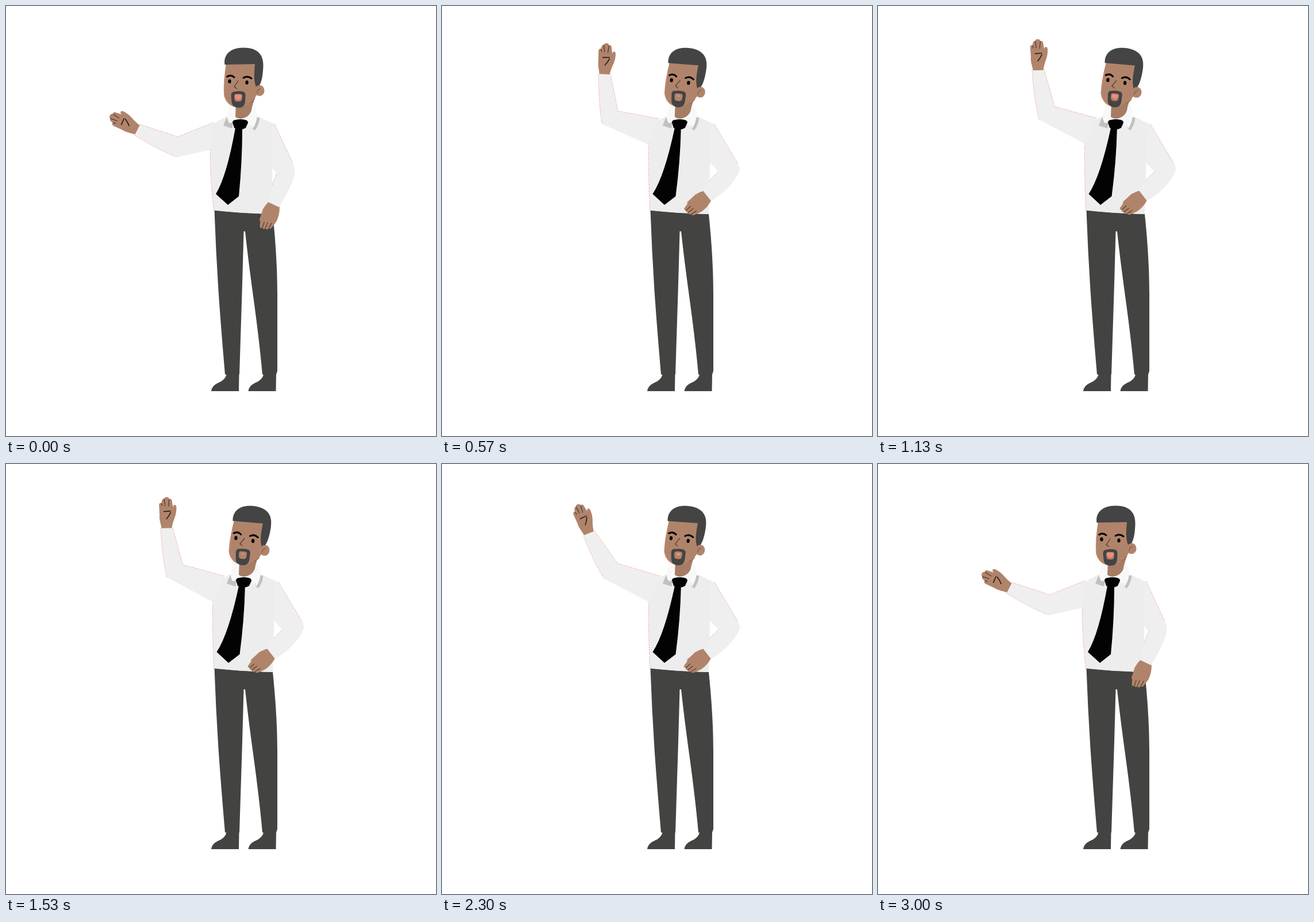
Recreate the animation shown at these times as an HTML page with a canvas. Size 748 px wide and 748 px high, loop 3.03 s.

```html
<!DOCTYPE html>
<html lang="en">
<head>
<meta charset="utf-8">
<title>Waving man</title>
<style>
html, body { margin: 0; width: 100%; height: 100%; overflow: hidden; background: #fff; }
canvas { display: block; width: 748px; height: 748px; }
</style>
</head>
<body>
<canvas id="stage" width="748" height="748"></canvas>
<script>
const ctx = document.getElementById('stage').getContext('2d');
const LOOP = 3030;
const RAD = Math.PI / 180;
const SHIRT = '#ededed', SLEEVE = '#efefef', SKIN = '#b0846b', HAIR = '#444', PANTS = '#434341';
const INK = '#030303', GRAY = '#c0c0c0', FRINGE = '#f29a92';

// [time, value] keys joined by a cosine ease
const KEYS = {
  lean:   [[0, 0], [640, 1], [2250, 1], [2890, 0]],
  head:   [[0, 0], [690, 1], [2150, 1], [2780, 0]],
  raise:  [[0, 0], [740, 1], [2370, 1], [2980, 0]],
  akimbo: [[0, 0], [640, 1], [2370, 1], [2950, 0]],
  fore:   [[0, 67], [480, 3], [835, 30], [1335, 1], [1835, 30], [2320, 30], [2980, 67]]
};

const lerp = (a, b, k) => a + (b - a) * k;

function track(keys, t) {
  for (let i = 1; i < keys.length; i++) {
    const [t0, a] = keys[i - 1], [t1, b] = keys[i];
    if (t < t1) return lerp(a, b, 0.5 - 0.5 * Math.cos(Math.PI * (t - t0) / (t1 - t0)));
  }
  return keys[keys.length - 1][1];
}

function fill(d, color) {
  ctx.fillStyle = color;
  ctx.fill(new Path2D(d));
}

function line(d, width, color) {
  ctx.lineWidth = width;
  ctx.strokeStyle = color;
  ctx.stroke(new Path2D(d));
}

function fringe(d) {
  ctx.setLineDash([2, 2]);
  line(d, 1, FRINGE);
  ctx.setLineDash([]);
}

function dot(x, y, rx, ry, color) {
  ctx.fillStyle = color;
  ctx.beginPath();
  ctx.ellipse(x, y, rx, ry, 0, 0, 7);
  ctx.fill();
}

function placed(x, y, deg, draw) {
  ctx.save();
  ctx.translate(x, y);
  ctx.rotate(deg * RAD);
  draw();
  ctx.restore();
}

function legs() {
  fill('M362.5 355 Q400 360 464 362 C468 400 472 450 472 500 L472 635 L470 641 L446 641 C442 595 435 540 428 490 Q420 430 416 392 L413.5 392 Q412 450 410.5 500 L406 641 L381 641 Q374 560 369.5 495 Q365 425 362.5 355 Z', PANTS);
  for (const x of [0, 64.5]) {
    placed(x, 0, 0, () =>
      fill('M384 639 L405.5 639 L405 670 L357 670 Q358 661 368 656 Q382 651 384 639 Z', PANTS));
  }
}

function torso(d) {
  const left = `M${358 + d} 206 L${355 + d * 0.7} 250 Q${356 + d * 0.6} 310 361.5 355.5`;
  fill(`${left} Q400 360 464 362 L${463 + d / 2} 280 L${466 + d} 205 L${438 + d} 192 L${384 + d} 192 Z`, SHIRT);
  fringe(left);
}

function leftHand() {
  ctx.scale(0.97, 0.96);
  fill('M-9 4 C-10 -8 -14 -14 -13 -24 L-14 -42 Q-13 -47 -10 -45 Q-9 -54 -5 -53 Q-4 -57 0 -56 Q3 -57 4 -53 Q8 -54 9 -50 L11 -38 Q12 -43 15 -42 Q18 -41 17 -32 C16 -18 10 -14 9 4 Z', SKIN);
  line('M-8 -40 L-10 -45 M-3 -40 L-5 -53 M3 -39 L4 -52', 1.1, '#3a2a22');
  line('M-6 -30 L7 -31 M7 -29 Q4 -22 -1 -16', 1.5, '#151210');
}

function leftArm(d, raise, fore) {
  const upper = 112 - 43 * raise, len = 75 + 11 * raise;
  const ex = 368 + d - len * Math.sin(upper * RAD);
  const ey = 217 - len * Math.cos(upper * RAD);
  const wx = ex - 76 * Math.sin(fore * RAD);
  const wy = ey - 76 * Math.cos(fore * RAD);
  const half = (91 - (fore + upper) / 2) * RAD;
  const hx = 17.7 * Math.sin(half), hy = -17.7 * Math.cos(half);
  const cuff = (fore * 1.1 - 11) * RAD;
  const cx = 10.5 * Math.cos(cuff), cy = -10.5 * Math.sin(cuff);

  placed(wx, wy, 12 - fore * 1.1, leftHand);

  const ox = ex - hx, oy = ey - hy;
  const qx = lerp(ox, wx - cx, 0.4) - 4 * Math.cos(fore * RAD);
  const qy = lerp(oy, wy - cy, 0.4) + 4 * Math.sin(fore * RAD);
  const top = `M${lerp(360, 380, raise)} ${lerp(203, 195, raise)} L${ex + hx} ${ey + hy} L${wx + cx} ${wy + cy}`;
  const outer = `${wx - cx} ${wy - cy} Q${qx} ${qy} ${ox} ${oy}`;
  fill(`${top} L${outer} L${lerp(356, 360, raise)} ${lerp(250, 240, raise)} Z`, SLEEVE);
  fringe(top);
  fringe('M' + outer);
}

function rightArm(k) {
  const p = (x0, y0, x1, y1) => `${lerp(x0, x1, k)} ${lerp(y0, y1, k)} `;
  placed(lerp(466, 461, k), lerp(346, 330, k), lerp(17.6, 47, k), () => {
    fill('M-10 -3 L10 -1 Q15 12 13 26 Q11 33 8 40 Q6 43 4 41 Q2 46 -2 44 Q-5 47 -7 44 Q-11 47 -12 43 L-14 34 Q-17 34 -16 27 L-16 13 Q-14 4 -10 -3 Z', SKIN);
    line('M-7 33 L-7 44 M-1 32 L-2 44 M6 31 L4 41', 1.1, '#4a352b');
  });
  const inner = `L${p(471, 291, 481, 288)}`;
  fill(`M${p(462, 203, 468, 203)} L${p(467, 205, 474, 206)} L${p(499, 274, 515, 274)}
    Q${p(505, 285, 521, 284)} ${p(501, 297, 515, 293)}
    Q${p(495, 318, 500, 320)} ${p(475, 350, 468, 339)}
    L${p(456, 341, 454, 321)} L${p(463, 311, 465, 304)} ${inner}
    L${p(463, 282, 466, 272)} Z`, SLEEVE);
  fringe(`M${p(463, 311, 465, 304)} ${inner}`);
  fringe(`M${p(467, 205, 474, 206)} L${p(499, 274, 515, 274)}`);
}

function collarAndTie(d) {
  placed(d, 0, 0, () => {
    fill('M392 170 Q386 180 385 192 L389 213 L399 205 L407 199 L420 203 L428 214 Q437 203 438 191 Q437 180 431 172 Z', '#f8f8f8');
    fill('M384 193 L378 208 L393 213 L396 201 L390 204 L387 202 Z', GRAY);
    line('M439 194 Q438 205 431 215', 5, GRAY);
    fill('M400 168 L399 193 Q407 199 418 193 Q427 188 428 176 L434 156 Z', '#a77c64');
    line('M427 207 L428 214', 1, '#d4d4d4');
  });
  fill(`M${399 + d} 212 L${411 + d * 0.8} 214 Q${411 + d * 0.6} 270 ${405 + d / 4} 331 L${386 + d / 6} 346 L${365 + d / 4} 327 Q${384 + d / 2} 296 ${399 + d} 212 Z`, INK);
  placed(d, 0, 0, () =>
    fill('M394 202 Q395 198 400 198 Q407 196 416 198 Q421 199 421 203 L417 212 Q407 218 397 212 Z', INK));
}

function face(mouth, shut) {
  dot(441, 147, 8.5, 9.5, SKIN);
  fill('M383 99 L436 99 L436 155 Q430 166 418 172 Q408 177 399 176 Q383 172 379 155 Q378 130 383 99 Z', SKIN);
  fringe('M381 118 Q378 140 380 157 Q383 168 393 174');
  line('M437 152 Q437 144 443 144', 1.4, '#86614e');
  line('M423 169 Q430 166 433 160', 1.2, '#8f6953');
  fill('M380.5 102 C378 84 391 72.5 413 72.5 C437 72.5 448 84 447.5 104 C447 120 445 131 441 138 Q437 138 435 141 C430 128 432 114 433 101 Z', HAIR);

  ctx.lineCap = 'round';
  line('M384.5 123 Q391 118.5 397 124 M413 125 Q420 120.5 427 126', 3, '#000');
  line('M404 130 L397 140.5 L401.5 143.5', 1.2, '#4d372d');
  if (shut) {
    line('M385 134 Q389 132 392 133.5 M416 136 Q420 135 423 136.5', 0.8, '#5a4134');
  } else {
    dot(389, 131, 2.7, 3.5, '#000');
    dot(419, 133, 2.7, 3.5, '#000');
  }
  ctx.lineCap = 'butt';

  fill('M391.5 155 Q391.5 149 398 149 Q404 147.5 410 148.5 Q416.5 149 416.5 155 L416 167 Q415 177 404 177 Q393 176 392.5 167 Z', HAIR);
  fill('M397 157 Q397 153 401 153 L407 153 Q411 153 411 157 L410.5 162 Q410 166 406 166 L402 166 Q398 166 397.5 162 Z', SKIN);
  placed(404, 157, 0, () => {
    ctx.scale(0.35 + 0.5 * mouth, 0.25 + 0.55 * mouth);
    fill('M-7 -2 Q-4 -4.5 0 -3 Q4 -4.5 7 -2 Q6.5 7 0 7.5 Q-6.5 7 -7 -2 Z', '#f58a78');
  });
}

function draw(t) {
  const v = {};
  for (const name in KEYS) v[name] = track(KEYS[name], t);
  const d = 6 * v.lean;
  const mouth = 0.5 + 0.5 * Math.cos(2 * Math.PI * t / 1010);
  const shut = t >= 1930 && t < 2090;

  ctx.fillStyle = '#fff';
  ctx.fillRect(0, 0, 748, 748);
  legs();
  torso(d);
  leftArm(d, v.raise, v.fore);
  rightArm(v.akimbo);
  collarAndTie(d);
  placed(405 + 4.7 * v.head, 190 - 0.9 * v.head, 6 * v.head, () => {
    ctx.translate(-405, -190);
    face(mouth, shut);
  });
}

const start = performance.now();
function tick() {
  draw((performance.now() - start) % LOOP);
  requestAnimationFrame(tick);
}
tick();
</script>
</body>
</html>
```
